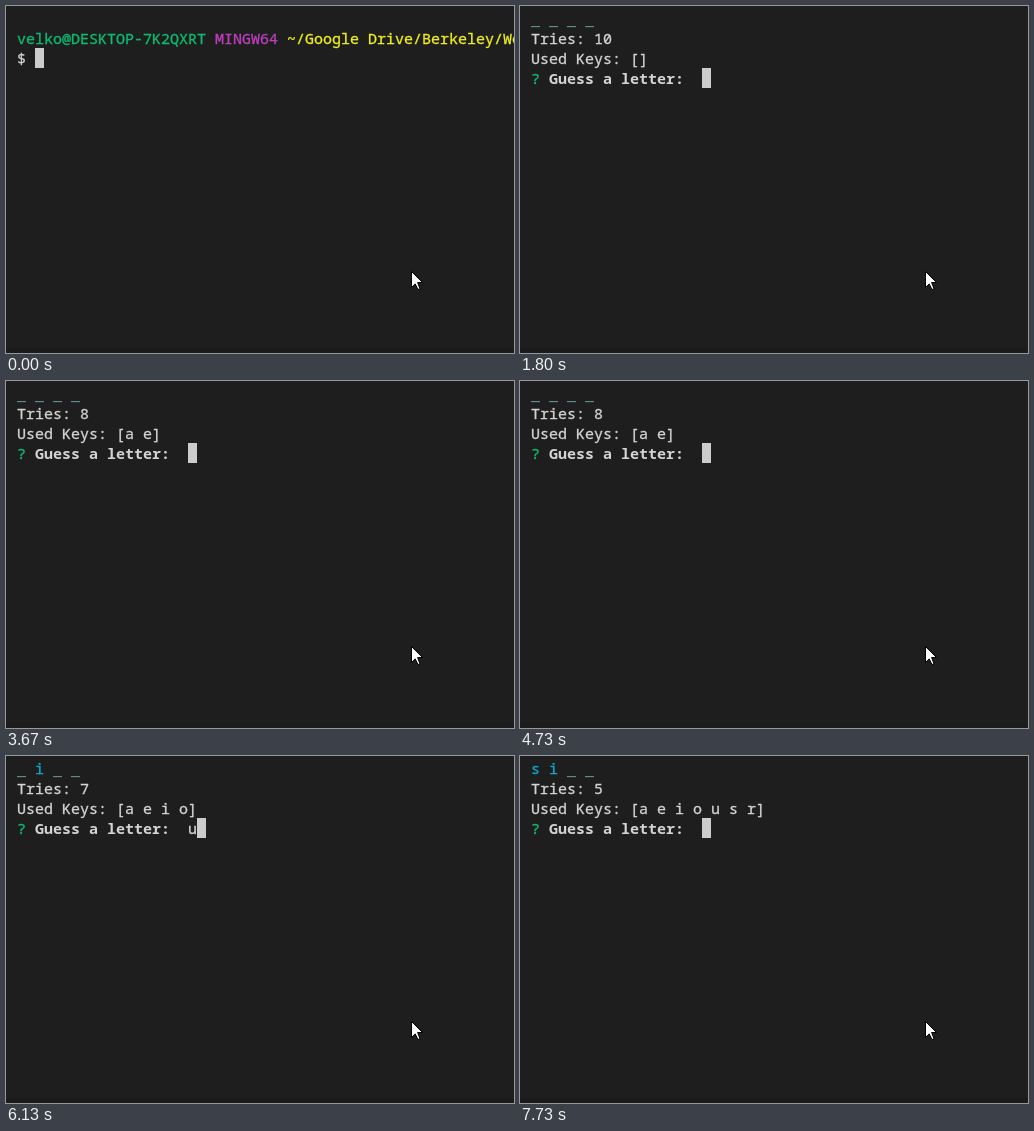
An HTML page for the animation above (8 s loop, 508x347 px).

```html
<!DOCTYPE html>
<html lang="en">
<head>
<meta charset="utf-8">
<title>Word guessing in a terminal</title>
<style>
  html, body { margin: 0; width: 100%; height: 100%; overflow: hidden; background: #1e1e1e; }
  #stage { position: relative; width: 508px; height: 347px; overflow: hidden; }
  #text {
    position: absolute; left: 11px; top: 2px; margin: 0; color: #d4d4d4;
    font: 15px/20px "Noto Sans Mono", "DejaVu Sans Mono", monospace;
    font-variant-ligatures: none;
    -webkit-text-stroke: .3px;
  }
  #text b { -webkit-text-stroke: 0; }
  #caret { position: absolute; width: 9px; height: 20px; background: #ccc; }
  #edge { position: absolute; top: 342px; width: 100%; height: 5px; background: #1b1b1b; }
  svg { position: absolute; left: 405px; top: 265px; }
  .green { color: #0dbc70; }
  .magenta { color: #bc3fbc; }
  .yellow { color: #f0f01c; }
  .cyan { color: #11a8cd; }
  .blank { position: relative; top: 1px; color: #5f8a90; -webkit-text-stroke: 0; }
</style>
</head>
<body>
<div id="stage">
  <div id="edge"></div>
  <pre id="text"></pre>
  <div id="caret"></div>
  <svg width="14" height="22">
    <path d="M.5 .5V16.5L4.2 12.9 7 18.5 9 17.8 6.6 11.5H11.5Z" fill="#fff" stroke="#000"/>
  </svg>
</div>
<script>
const LOOP = 8000, GAME_START = 1800;
const text = document.getElementById('text');
const caret = document.getElementById('caret');

const SHELL = [[0, ''], [130, 'clear'], [730, 'node index.js ']];
const RUN_AT = 1400;
const ANSWER = 'si__';
// time and key: a letter, '<' for backspace or '!' for enter
const KEYS = [
  [2930, 'a'], [3070, '!'], [3530, 'e'], [3670, '!'],
  [4200, 'o'], [4730, '<'], [4930, 'i'], [5130, '!'],
  [5600, 'o'], [5670, '!'], [6130, 'u'], [6470, '!'],
  [6870, 's'], [7070, '!'], [7470, 'r'], [7730, '!']
];

const span = (cls, s) => `<span class="${cls}">${s}</span>`;

function shellScreen(t) {
  const typed = SHELL.filter(([at]) => at <= t).pop()[1];
  const prompt = span('green', 'velko@DESKTOP-7K2QXRT') + ' ' +
    span('magenta', 'MINGW64') + ' ' + span('yellow', '~/Google Drive/Berkeley/Work');
  const running = t >= RUN_AT;
  return {
    html: `\n${prompt}\n$ ${typed}`,
    col: running ? 0 : 2 + typed.length,
    row: running ? 3 : 2
  };
}

function gameScreen(t) {
  const used = [];
  let input = '';
  for (const [at, key] of KEYS) {
    if (at > t) break;
    if (key === '!') used.push(input);
    input = key === '!' || key === '<' ? '' : key;
  }
  const word = [...ANSWER]
    .map(c => used.includes(c) ? span('cyan', c) : span('blank', '_')).join(' ');
  const tries = 10 - used.filter(c => !ANSWER.includes(c)).length;
  return {
    html: `${word}\nTries: ${tries}\nUsed Keys: [${used.join(' ')}]\n` +
      `${span('green', '?')} <b>Guess a letter:</b>  ${input}`,
    col: 19 + input.length,
    row: 3
  };
}

let shown;
function draw(now) {
  const t = now % LOOP;
  const { html, col, row } = t < GAME_START ? shellScreen(t) : gameScreen(t);
  if (html !== shown) text.innerHTML = shown = html;
  caret.style.left = 11 + col * 9 + 'px';
  caret.style.top = 2 + row * 20 + 'px';
}

let start;
function tick(now) {
  start ??= now;
  draw(now - start);
  requestAnimationFrame(tick);
}
draw(0);
requestAnimationFrame(tick);
</script>
</body>
</html>
```
